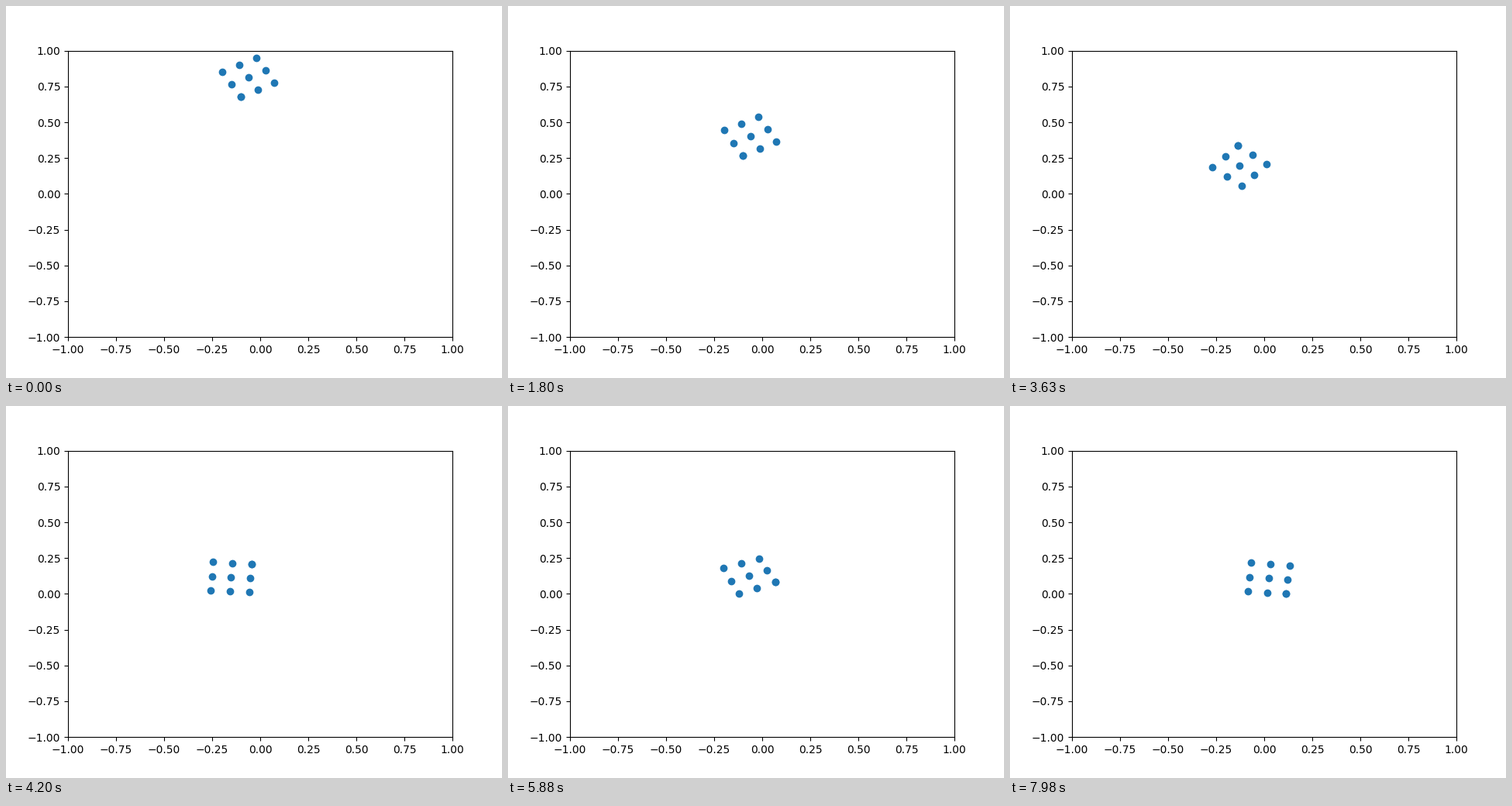
Recreate the animation shown at these times as a matplotlib script. Size 640 px wide and 480 px high, loop 8000 ms.

```python
import numpy as np
import matplotlib.pyplot as plt
from matplotlib.animation import FuncAnimation

FRAMES, INTERVAL = 400, 20
SPACING = 0.1
DRAG = 0.0142        # share of speed lost per step
TERMINAL = 0.0215    # falling speed at which drag balances gravity
START_HEIGHT = 0.8133

# Flights between floor contacts: (step, x, turn in degrees) at both ends.
# The last one is a slide along the floor.
FLIGHTS = [
    ((0, -0.0613, 28.65), (79, -0.0613, 28.65)),
    ((94, -0.0835, -33.0), (140, -0.1524, -185.7)),
    ((152, -0.1351, -221.5), (191, -0.0734, -243.5)),
    ((197, -0.0653, -247.5), (214, -0.0419, -258.0)),
    ((220, -0.0327, -267.0), (236, -0.0121, -279.0)),
    ((242, -0.0036, -276.0), (265, 0.0230, -274.9)),
]


class Flight:
    """Motion of (x, height, turn) under gravity and drag between two points."""

    def __init__(self, start, end, falling, height=None):
        self.t0, self.t1 = start[0], end[0]
        self.p0, self.p1 = self.state(start, height), self.state(end)
        self.sink = np.array([0, TERMINAL if falling else 0, 0])
        span = self.t1 - self.t0
        self.reach = (self.p1 - self.p0 + self.sink * span) / (1 - np.exp(-DRAG * span))

    @staticmethod
    def state(key, height=None):
        _, x, turn = key
        if height is None:  # the lowest corner touches the floor
            a = np.radians(turn)
            height = SPACING * (abs(np.sin(a)) + abs(np.cos(a)))
        return np.array([x, height, turn])

    def at(self, step):
        t = step - self.t0
        return self.p0 + self.reach * (1 - np.exp(-DRAG * t)) - self.sink * t

    def speed(self, step):
        return self.reach * DRAG * np.exp(-DRAG * (step - self.t0)) - self.sink


flights = [Flight(a, b, i < len(FLIGHTS) - 1, START_HEIGHT if i == 0 else None)
           for i, (a, b) in enumerate(FLIGHTS)]


def contact(before, after, step):
    """Smooth turn-round from one flight to the next, with a squash."""
    h = after.t0 - before.t1
    s = (step - before.t1) / h
    v0, v1 = before.speed(before.t1), after.speed(after.t0)
    p = ((1 + 2 * s) * (1 - s) ** 2 * before.p1 + s * (1 - s) ** 2 * h * v0
         + s * s * (3 - 2 * s) * after.p0 + s * s * (s - 1) * h * v1)
    return p, 11.4 * abs(v0[1]) * np.sin(np.pi * s)


def pose(step):
    i = max(k for k, f in enumerate(flights) if f.t0 <= step)
    if step <= flights[i].t1:
        return flights[i].at(step), 0
    return contact(flights[i], flights[i + 1], step)


row, col = (g.ravel() for g in np.mgrid[-1:2, -1:2])
# the outline starts and ends at the same corner
row, col = np.append(row, row[0]), np.append(col, col[0])


def points(step):
    (x, height, turn), squash = pose(step)
    c, s = np.cos(np.radians(turn)), np.sin(np.radians(turn))
    dx = SPACING * (c * col - s * row) * (1 + 0.45 * squash)
    dy = SPACING * (s * col + c * row) * (1 - squash)
    twist = 0.11 * squash * row * col
    return x + dx, np.maximum(height + dy + twist, 0)


fig, ax = plt.subplots(figsize=(6.4, 4.8), dpi=100)
ax.set_xlim(-1, 1)
ax.set_ylim(-1, 1)
dots, = ax.plot(*points(0), "o", color="#1f77b4")


def update(k):
    # the motion advances every 30 ms, after a first hold of 60 ms
    step = max((2 * k + 1) // 3 - 1, 0)
    dots.set_data(*points(step))
    return dots,


anim = FuncAnimation(fig, update, frames=FRAMES, interval=INTERVAL,
                     repeat=True, repeat_delay=0)
plt.show()
```
